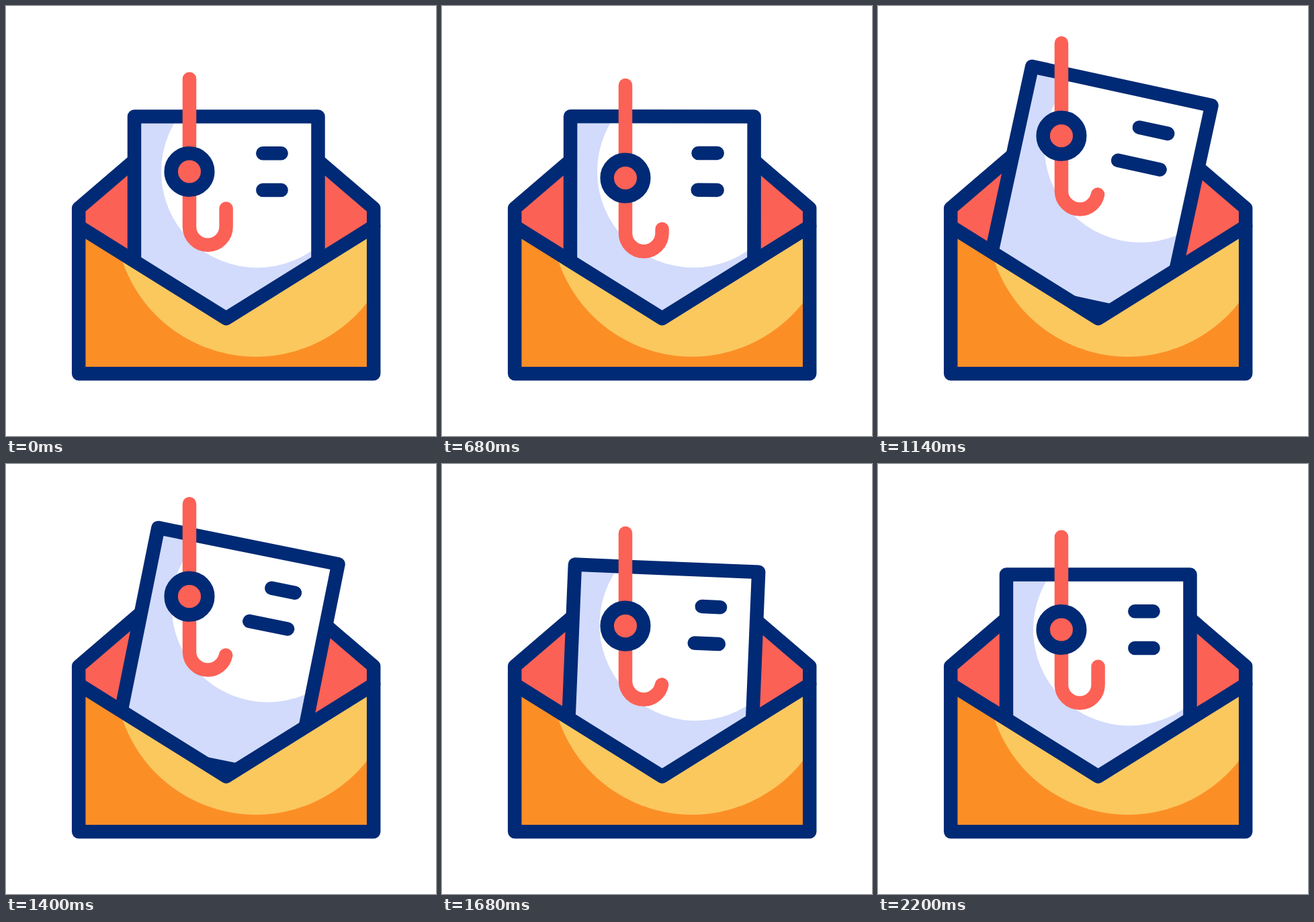
Animation, 640 px wide and 640 px high, one loop 2.4 s. Source, as an HTML page:

```html
<!DOCTYPE html>
<html lang="en">
<head>
<meta charset="utf-8">
<title>Hooked letter</title>
<style>
  html, body { margin: 0; width: 100%; height: 100%; overflow: hidden; background: #fff; }
  svg { display: block; width: 100%; height: 100%; }
  .line { fill: none; stroke: #002a75; stroke-width: 20.5; stroke-linecap: round; stroke-linejoin: round; }
</style>
</head>
<body>
<svg viewBox="0 0 640 640">
  <defs>
    <clipPath id="sheet"><path d="M191 164.5H464.5V494.8H191Z"/></clipPath>
    <clipPath id="pocket"><path d="M108.2 328L327.7 465L547.2 328V547.2H108.2Z"/></clipPath>
  </defs>

  <path fill="#fc6156" d="M108.2 301L215 209.5H440.4L547.2 301V328L327.7 465L108.2 328Z"/>
  <path class="line" d="M215 209.5L108.2 301V328M440.4 209.5L547.2 301V328"/>

  <g id="letter">
    <g clip-path="url(#sheet)">
      <path fill="#d2dbfb" d="M191 164.5H464.5V494.8H191Z"/>
      <circle cx="374" cy="246.5" r="143" fill="#fff"/>
    </g>
    <path class="line" d="M191 164.5H464.5V494.8H191Z"/>
    <path class="line" id="bar1"/>
    <path class="line" id="bar2"/>
  </g>

  <g clip-path="url(#pocket)">
    <path fill="#fb8f26" d="M108 328H548V548H108Z"/>
    <circle cx="372" cy="312" r="210" fill="#fbc85e"/>
  </g>
  <path class="line" d="M108.2 328L327.7 465L547.2 328V547.2H108.2Z"/>

  <g id="hook">
    <path class="line" id="wire" style="stroke:#fc6156" d="M273 108.5V328.5a27.3 27.3 0 0 0 54.6 0V301.5"/>
    <circle class="line" cx="273" cy="246.5" r="27.3" style="fill:#fc6156"/>
  </g>
</svg>
<script>
  const LOOP = 2400;
  const WIRE = 220 + Math.PI * 27.3 + 27;
  const el = id => document.getElementById(id);
  const [letter, bar1, bar2, hook, wire] = ['letter', 'bar1', 'bar2', 'hook', 'wire'].map(el);

  // Smooth 0..1 step between two times
  const ease = (t, from, to) => {
    const p = Math.min(1, Math.max(0, (t - from) / (to - from)));
    return (1 - Math.cos(Math.PI * p)) / 2;
  };
  // Rises over a..b, falls over c..d
  const pulse = (t, a, b, c, d) => ease(t, a, b) - ease(t, c, d);

  function draw(t) {
    const dip = 20 * pulse(t, 200, 450, 1940, 2200);
    const pull = 75 * pulse(t, 510, 1210, 1285, 1940);
    hook.setAttribute('transform', `translate(0 ${dip - pull})`);

    const trim = 32.5 * pulse(t, 480, 817, 1680, 1960);
    wire.setAttribute('stroke-dasharray', `${WIRE - trim + (trim ? 0 : 5)} 999`);

    const lift = pulse(t, 660, 1210, 1285, 1837);
    letter.setAttribute('transform', `translate(0 ${-51.2 * lift}) rotate(${12.75 * lift} 327.75 330)`);

    bar1.setAttribute('d', `M${382.3 - 16 * pulse(t, 600, 1140, 1140, 1660)} 219.2H409.6`);
    bar2.setAttribute('d', `M${382.3 - 37.5 * pulse(t, 600, 1200, 1200, 1910)} 274H409.6`);
  }

  const start = performance.now();
  function tick() {
    draw((performance.now() - start) % LOOP);
    requestAnimationFrame(tick);
  }
  tick();
</script>
</body>
</html>
```
